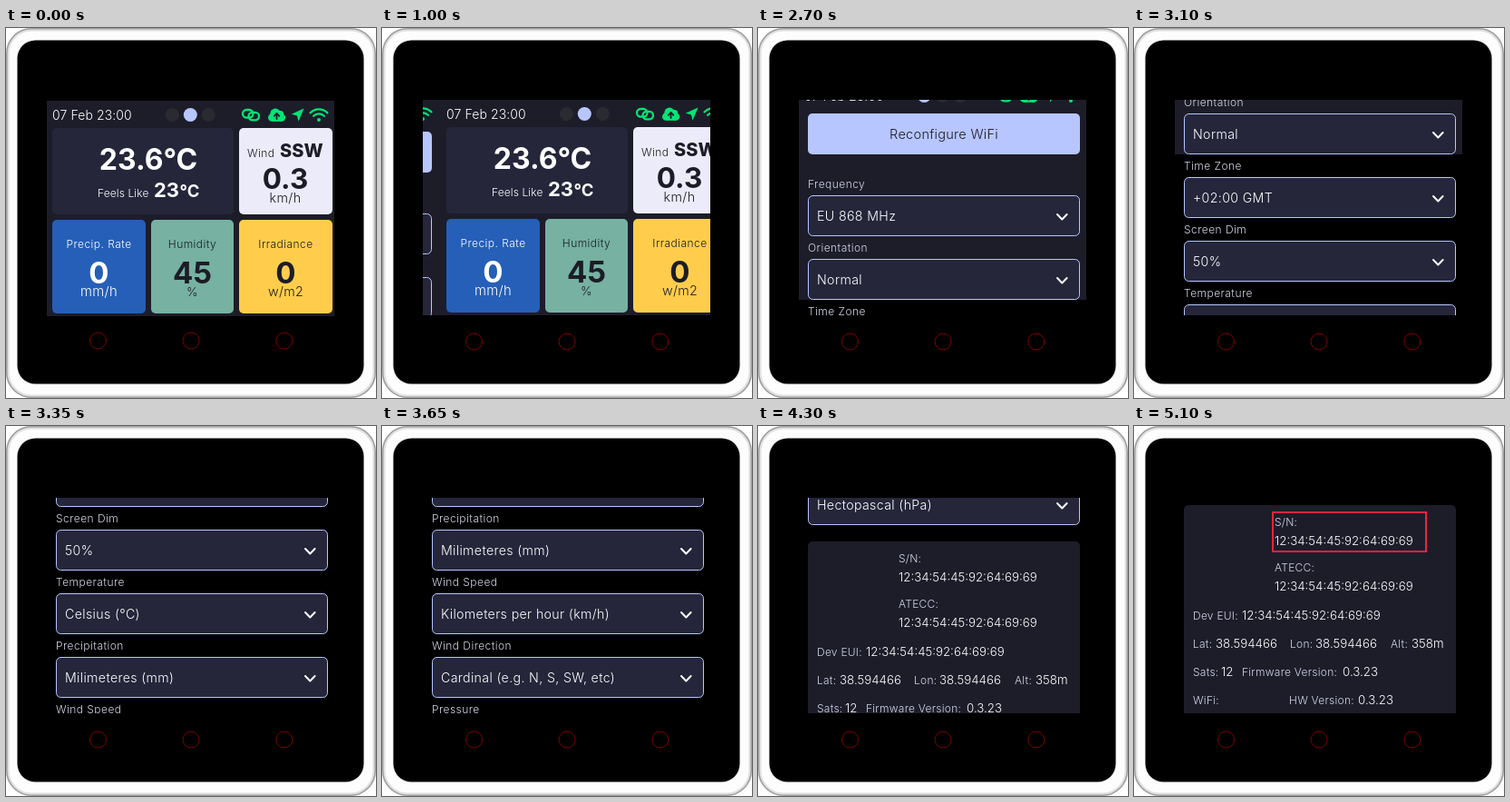
These frames come from a looping animation (408 by 407 pixels, 8100 ms). An HTML page with a canvas:

```html
<!DOCTYPE html>
<html lang="en">
<head>
<meta charset="utf-8">
<title>Weather station</title>
<style>
  html, body { margin: 0; width: 100%; height: 100%; overflow: hidden; background: #fff; }
  canvas { display: block; width: 408px; height: 407px; }
</style>
</head>
<body>
<canvas id="stage"></canvas>
<script>
const W = 408, H = 407, LOOP = 8100, STEP = 50, HOP = 20;
const PAGE_W = 320, PAGE_H = 240, LEFT = 45, TOP = 79;
const C = {
  page: '#1d1d2a', tile: '#25263a', accent: '#b8c6ff', light: '#ebebfa', white: '#ffffff',
  label: '#d3d6ea', dark: '#1c1c26', blue: '#255fb7', teal: '#76b1a1', yellow: '#ffcd4b',
  green: '#00e676', dot: '#2a2a31', red: '#f5213f', ring: '#800000'
};

const canvas = document.getElementById('stage');
const ctx = canvas.getContext('2d');
const scale = window.devicePixelRatio || 1;
canvas.width = W * scale;
canvas.height = H * scale;

// y is the middle of the capital letters
function text(str, x, y, size, color, { weight = 350, align = 'left', track = 0 } = {}) {
  ctx.font = `${weight} ${size}px Inter, "Open Sans", sans-serif`;
  ctx.letterSpacing = track + 'px';
  ctx.textAlign = align;
  ctx.fillStyle = color;
  ctx.fillText(str, x, y + size * 0.3635);
}

const label = (str, x, y, color = C.label, align = 'left') =>
  text(str, x, y, 12, color, { align, track: 0.45 });
const value = (str, x, y) => text(str, x, y, 13.3, C.white);

function box(x, y, w, h, r, fill, stroke) {
  ctx.beginPath();
  ctx.roundRect(x, y, w, h, r);
  if (fill) { ctx.fillStyle = fill; ctx.fill(); }
  if (stroke) { ctx.strokeStyle = stroke; ctx.stroke(); }
}

function disc(x, y, r, fill) {
  ctx.beginPath();
  ctx.arc(x, y, r, 0, Math.PI * 2);
  ctx.fillStyle = fill;
  ctx.fill();
}

function line(points, color, width) {
  ctx.beginPath();
  points.forEach(([x, y]) => ctx.lineTo(x, y));
  ctx.strokeStyle = color;
  ctx.lineWidth = width;
  ctx.lineCap = ctx.lineJoin = 'round';
  ctx.stroke();
  ctx.lineWidth = 1;
}

function linkIcon() {
  ctx.lineWidth = 2.3;
  box(261, 89, 11.5, 8.6, 4.3, null, C.green);
  box(267.5, 91.8, 11.5, 8.6, 4.3, null, C.green);
  ctx.lineWidth = 1;
}

function cloudIcon() {
  disc(297, 93.2, 5.6, C.green);
  disc(302.5, 93.8, 3.8, C.green);
  disc(293.3, 97.5, 4.3, C.green);
  disc(304, 97.6, 4.2, C.green);
  box(293.3, 94, 10.7, 7.8, 0, C.green);
  line([[298.5, 99], [298.5, 93.4]], C.page, 1.8);
  line([[295.7, 95.8], [298.5, 93], [301.3, 95.8]], C.page, 1.8);
}

function arrowIcon() {
  ctx.beginPath();
  [[328.5, 87.5], [322.5, 101.8], [321, 95.4], [314.8, 93.8]].forEach(([x, y]) => ctx.lineTo(x, y));
  ctx.closePath();
  ctx.fillStyle = C.green;
  ctx.fill();
}

function wifiIcon() {
  ctx.strokeStyle = C.green;
  ctx.lineWidth = 2.2;
  ctx.lineCap = 'round';
  for (const r of [8, 13]) {
    ctx.beginPath();
    ctx.arc(345, 101.3, r, -Math.PI * 0.76, -Math.PI * 0.24);
    ctx.stroke();
  }
  ctx.lineWidth = 1;
  disc(345, 99.9, 2, C.green);
}

function statusBar(active) {
  text('07 Feb 23:00', 51, 94.5, 14, C.white, { track: 0.1 });
  for (let i = 0; i < 3; i++) disc(183.3 + i * 20, 94.5, 7.5, i === active ? C.accent : C.dot);
  linkIcon();
  cloudIcon();
  arrowIcon();
  wifiIcon();
}

function page(active) {
  box(LEFT, TOP, PAGE_W, PAGE_H, 0, C.page);
  statusBar(active);
}

function gauge(x, w, fill, ink, name, amount, unit, unitSize) {
  const mid = x + w / 2;
  box(x, 210, w, 103, 5, fill);
  label(name, mid, 237, ink, 'center');
  text(amount, mid, 268.5, 33, ink, { weight: 700, align: 'center' });
  text(unit, mid, 289, unitSize, ink, { align: 'center', track: 0.3 });
}

function dashboard() {
  page(1);
  box(51, 109, 200, 95, 5, C.tile);
  text('23.6°C', 157, 143, 32, C.white, { weight: 700, align: 'center' });
  text('Feels Like', 101, 180.7, 12, C.white, { track: 0.1 });
  text('23', 163, 177, 22, C.white, { weight: 700 });
  text('°C', 191.5, 178.4, 18.5, C.white, { weight: 700 });

  box(257, 109, 103, 95, 5, C.light);
  label('Wind', 266, 136.3, C.dark);
  text('SSW', 302, 134, 20, C.dark, { weight: 800 });
  text('0.3', 308, 165, 31.5, C.dark, { weight: 700, align: 'center' });
  text('km/h', 308, 186, 14.3, C.dark, { align: 'center', track: 0.4 });

  gauge(51, 103, C.blue, C.white, 'Precip. Rate', '0', 'mm/h', 14.8);
  gauge(160, 91, C.teal, C.dark, 'Humidity', '45', '%', 13.5);
  gauge(257, 103, C.yellow, C.dark, 'Irradiance', '0', 'w/m2', 14.3);
}

const FIELDS = [
  ['Frequency', 'EU 868 MHz'],
  ['Orientation', 'Normal'],
  ['Time Zone', '+02:00 GMT'],
  ['Screen Dim', '50%'],
  ['Temperature', 'Celsius (°C)'],
  ['Precipitation', 'Milimeteres (mm)'],
  ['Wind Speed', 'Kilometers per hour (km/h)'],
  ['Wind Direction', 'Cardinal (e.g. N, S, SW, etc)'],
  ['Pressure', 'Hectopascal (hPa)']
];

function field([name, choice], i) {
  const y = 192 + i * 70;
  label(name, 55, y);
  box(55.5, y + 12.5, 299, 44, 5, C.tile, C.accent);
  text(choice, 65, y + 35, 14.2, C.white, { track: 0.35 });
  line([[330, y + 33], [335.3, y + 38.5], [340.6, y + 33]], C.white, 2);
}

function deviceInfo() {
  const serial = '12:34:54:45:92:64:69:69';
  const info = [
    ['S/N:', 155, 19, serial, 155, 39],
    ['ATECC:', 155, 69, serial, 155, 89],
    ['Dev EUI:', 65, 121.5, serial, 119, 121],
    ['Lat:', 65, 153, '38.594466', 90, 152.5],
    ['Lon:', 172, 153, '38.594466', 200, 152.5],
    ['Alt:', 283, 153, '358m', 306, 152.5],
    ['Sats:', 65, 183.5, '12', 96, 183],
    ['Firmware Version:', 119, 183.5, '0.3.23', 230, 183],
    ['WiFi:', 65, 214.5, '', 0, 0],
    ['HW Version:', 171, 214.5, '0.3.23', 247, 214]
  ];
  const y = 827;
  box(55, y, 300, 250, 5, C.page);
  for (const [name, nx, ny, val, vx, vy] of info) {
    text(name, nx, y + ny, 12, C.label, { track: 0.25 });
    value(val, vx, y + vy);
  }
}

function settings() {
  page(0);
  box(55, 114, 300, 45, 5, C.accent);
  text('Reconfigure WiFi', 205, 137, 14.6, C.dark, { align: 'center', track: 0.25 });
  FIELDS.forEach(field);
  deviceInfo();
}

function device(dy) {
  ctx.fillStyle = '#fff';
  ctx.fillRect(0, 0, W, H);
  box(0, 0, W, H, 28, '#fdfdfd');
  [['#e0e0e0', 3.6], ['#a0a0a0', 1.6]].forEach(([color, width]) => {
    const inset = width / 2;
    ctx.lineWidth = width;
    box(inset, inset, W - width, H - width, 28 - inset, null, color);
  });
  ctx.lineWidth = 1;
  box(12.5, 13.5, 382, 378, 20, '#000');
  for (const x of [101.5, 204, 306.8]) {
    ctx.beginPath();
    ctx.arc(x, 345 - dy, 9, 0, Math.PI * 2);
    ctx.strokeStyle = C.ring;
    ctx.stroke();
  }
}

// Distance in whole hops, from [time, hops] keys
function travel(t, keys) {
  if (t <= keys[0][0]) return 0;
  for (let i = 1; i < keys.length; i++) {
    const [t0, a] = keys[i - 1], [t1, b] = keys[i];
    if (t <= t1) return HOP * Math.round(a + (b - a) * (t - t0) / (t1 - t0));
  }
  return HOP * keys[keys.length - 1][1];
}

const SLIDE = [[950, 0], [1000, 1], [1700, 16]];
const SCROLL = [[2650, 0], [3100, 9], [3650, 22], [4000, 29], [4400, 37]];

function draw(time) {
  const t = Math.floor(time / STEP) * STEP;
  const slide = travel(t, SLIDE), scroll = travel(t, SCROLL);
  const mark = Math.min(1, Math.max(0, (t - 4850) / 250));
  const dy = t < 1000 ? 1 : 0;

  ctx.setTransform(scale, 0, 0, scale, 0, 0);
  device(dy);

  ctx.save();
  ctx.beginPath();
  ctx.rect(LEFT, TOP + dy, 317, 237);
  ctx.clip();
  ctx.translate(slide, dy);
  if (slide < PAGE_W) dashboard();
  ctx.translate(-PAGE_W, -scroll);
  if (slide > 0) settings();
  ctx.restore();

  if (mark > 0) {
    ctx.globalAlpha = mark;
    ctx.lineWidth = 2;
    box(153, 95, 169, 43, 0, null, C.red);
    ctx.lineWidth = 1;
    ctx.globalAlpha = 1;
  }
}

function tick() {
  draw(performance.now() % LOOP);
  requestAnimationFrame(tick);
}
tick();
</script>
</body>
</html>
```
